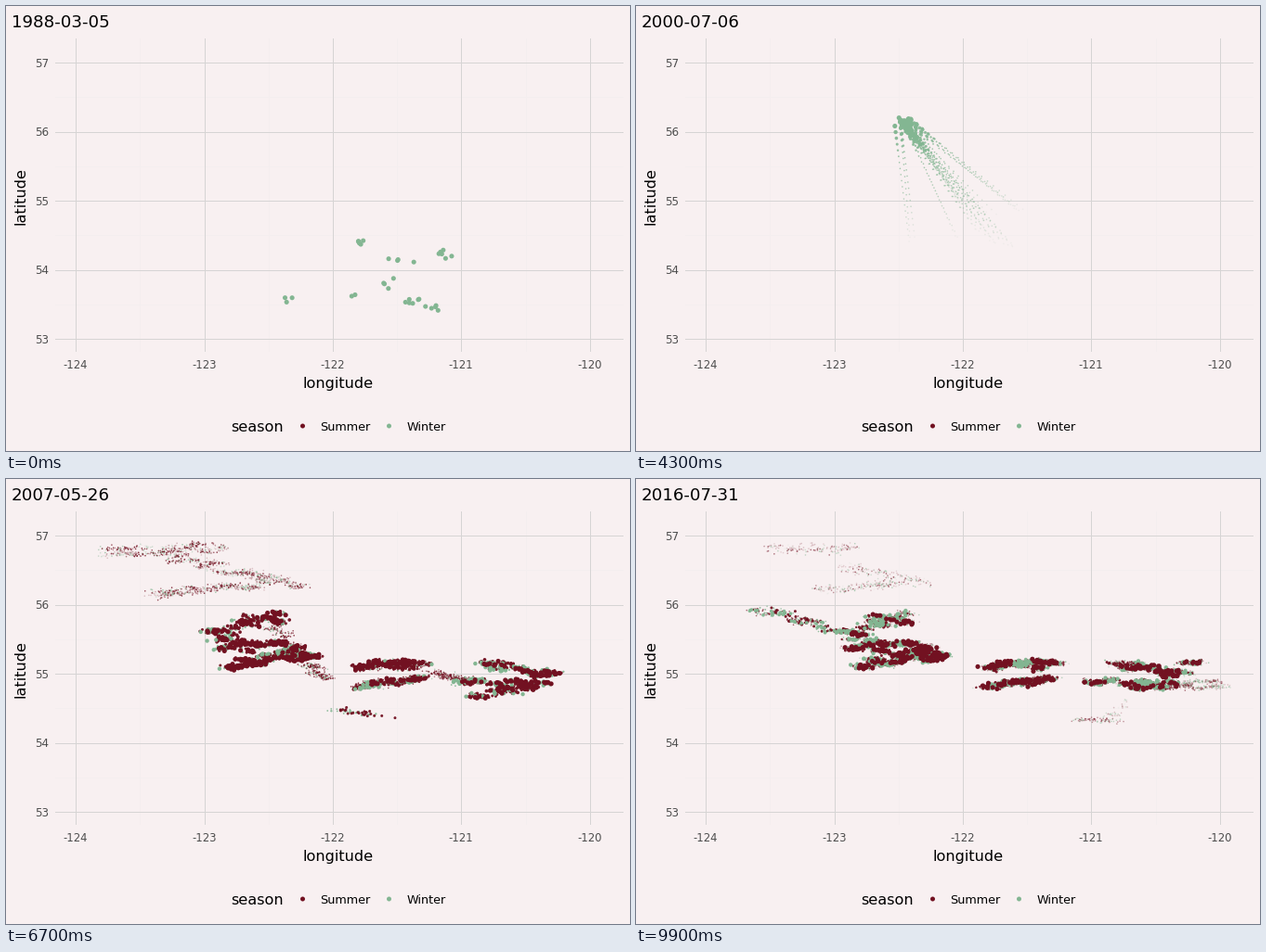
These frames come from a looping animation (672 px wide and 480 px high, 10 s). A matplotlib script:

```python
import matplotlib.pyplot as plt
import numpy as np
from matplotlib.animation import FuncAnimation
from matplotlib.colors import to_rgb

W, H, DPI = 672, 480, 96
PX = 72 / DPI
FRAMES = 100
START = np.datetime64("1988-03-05")
SPAN = 10375  # days shown in one loop
LIFE = 20     # frames a sighting lingers in the wake
BG, MAJOR, MINOR = "#f8f0f1", "#d6d4d4", "#f4eeef"
SUMMER, WINTER = "#721121", "#83b692"

rng = np.random.default_rng(11)
sightings = []  # x, y, birth, life, summer


def day(frame):
    return START + int(SPAN * frame / (FRAMES - 1))


def is_summer(frame):
    month = day(frame).astype("datetime64[M]").astype(int) % 12 + 1
    return 5 <= month <= 10


def trekkers(sites, goal, leave, arrive):
    """Animals stay around home, then walk in straight lines to one goal."""
    for x, y, count in sites:
        for home in rng.normal((x, y), (5, 2.5), (count, 2)):
            sightings.append((*home, 0, LIFE, False))
            for f in range(1, leave):
                summer = is_summer(f)
                if rng.random() < (0.85 if summer else 0.25):
                    sightings.append((*rng.normal(home, (14, 6)), f, LIFE, summer))
            end = goal + rng.uniform(-4, 4, 2)
            for f in range(leave, arrive + 1):
                k = (f - leave) / (arrive - leave)
                life = min(LIFE, arrive + 7 - f)
                sightings.append((*(home + (end - home) * k), f, life, False))


def herd(first, last, density, ridges, lo=0.0):
    """Repeated visits to favourite spots along ridges (x0, y0, x1, y1, spread)."""
    for x0, y0, x1, y1, spread in ridges:
        count = max(3, int(np.hypot(x1 - x0, y1 - y0) / 6))
        t = lo + (1 - lo) * (np.arange(count) + rng.random(count)) / count
        sx = x0 + (x1 - x0) * t
        sy = y0 + (y1 - y0) * t + rng.uniform(-spread, spread, count)
        for f in range(first, last + 1):
            summer = is_summer(f)
            visits = density * (9 if summer else 6)
            for x, y in zip(sx, sy):
                if rng.random() < 0.65:
                    n = rng.poisson(visits)
                    px, py = rng.normal(x, 5, n), rng.normal(y, 1.3, n)
                    sightings.extend((a, b, f, LIFE, summer) for a, b in zip(px, py))


SOUTH = [(302, 316, 3), (376, 312, 2), (379, 255, 5), (426, 273, 4), (468, 268, 6),
         (410, 299, 4), (438, 319, 6), (458, 325, 5)]
NORTH = [(105, 78, 235, 74, 5), (175, 84, 318, 115, 5), (155, 125, 285, 112, 4)]
CENTRE = [(215, 171, 330, 189, 9), (245, 156, 297, 148, 6), (238, 201, 330, 186, 6)]
EAST = [(378, 203, 452, 199, 4), (375, 227, 450, 213, 4)]
FAR_EAST = [(482, 219, 508, 218, 2), (515, 200, 592, 211, 4), (525, 222, 578, 222, 4)]

trekkers(SOUTH, np.array((280, 115)), 14, 45)
herd(45, 52, 0.5, NORTH)
herd(53, 61, 0.25, NORTH)
herd(68, 82, 0.35, NORTH, lo=0.3)
herd(83, 88, 0.12, NORTH, lo=0.3)
herd(53, 61, 0.7, [(280, 150, 345, 219, 6), (455, 209, 497, 217, 2)])
herd(53, 61, 0.25, EAST)
herd(62, 64, 0.5, [(352, 247, 412, 257, 1)])
herd(62, 99, 0.9, CENTRE)
herd(62, 99, 0.8, EAST)
herd(62, 99, 0.7, FAR_EAST)
herd(64, 68, 0.5, [(500, 236, 570, 224, 3)])
herd(72, 99, 0.5, [(585, 203, 608, 198, 5)])
herd(74, 88, 0.9, [(550, 222, 630, 222, 4)])
herd(80, 84, 0.5, [(508, 255, 528, 240, 3)])
herd(85, 86, 1.2, [(476, 260, 512, 260, 1)])
herd(88, 97, 0.35, [(130, 139, 218, 164, 4)])

data = np.array(sightings, float)
data = data[np.argsort(data[:, 2], kind="stable")]
xy, birth, life = data[:, :2], data[:, 2], data[:, 3]
rgb = np.where(data[:, 4:] > 0, to_rgb(SUMMER), to_rgb(WINTER))

# Stage in pixel coordinates, y down
plt.rcParams["font.family"] = "DejaVu Sans"
fig = plt.figure(figsize=(W / DPI, H / DPI), dpi=DPI, facecolor=BG)
ax = fig.add_axes([0, 0, 1, 1])
ax.set(xlim=(0, W), ylim=(H, 0))
ax.axis("off")


def label(x, y, s, size, color="black", **kw):
    return ax.text(x, y, s, fontsize=size * PX, color=color, va="baseline", **kw)


def grid_x(i):
    return 75.3 + 138.35 * i


def grid_y(i):
    return 61.2 + 74.5 * i


def rules(steps, color, z):
    for i in steps:
        ax.plot([grid_x(i)] * 2, [35, 372], color=color, lw=PX, zorder=z)
        ax.plot([53, 664], [grid_y(i)] * 2, color=color, lw=PX, zorder=z)


rules(np.arange(4) + 0.5, MINOR, 1)
rules(range(5), MAJOR, 2)
for i in range(5):
    label(grid_x(i) - 0.5, 391, f"-{124 - i}", 11.6, "#4d4d4d", ha="center")
    label(46.5, grid_y(i) + 4.5, f"{57 - i}", 11.9, "#4d4d4d", ha="right")

label(358, 412, "longitude", 16.1, ha="center")
label(20.5, 204.5, "latitude", 16.1, ha="center", rotation=90,
      rotation_mode="anchor")
label(242.5, 459, "season", 16.1)
label(338.5, 458, "Summer", 12.7)
label(432, 458, "Winter", 12.7)
title = label(6, 23, "", 18.2)


def area(radius):
    return (2 * radius * PX) ** 2


ax.scatter([319.5, 412.5], [453, 453], s=area(2.5), c=[SUMMER, WINTER], lw=0)
dots = ax.scatter([], [], lw=0, zorder=3)


def draw(frame):
    age = frame - birth
    on = (age >= 0) & (age < life)
    a = age[on]
    radius = np.maximum(0.8, 2.55 * np.clip(1 - a / 10, 0, 1) ** 1.5)
    alpha = 1 - (a / life[on]) ** 1.5
    dots.set_offsets(xy[on])
    dots.set_sizes(area(radius))
    dots.set_facecolors(np.column_stack([rgb[on], alpha]))
    title.set_text(str(day(frame)))
    return dots, title


anim = FuncAnimation(fig, draw, frames=FRAMES, interval=100, repeat=True,
                     repeat_delay=0, init_func=lambda: draw(0))
plt.show()
```
